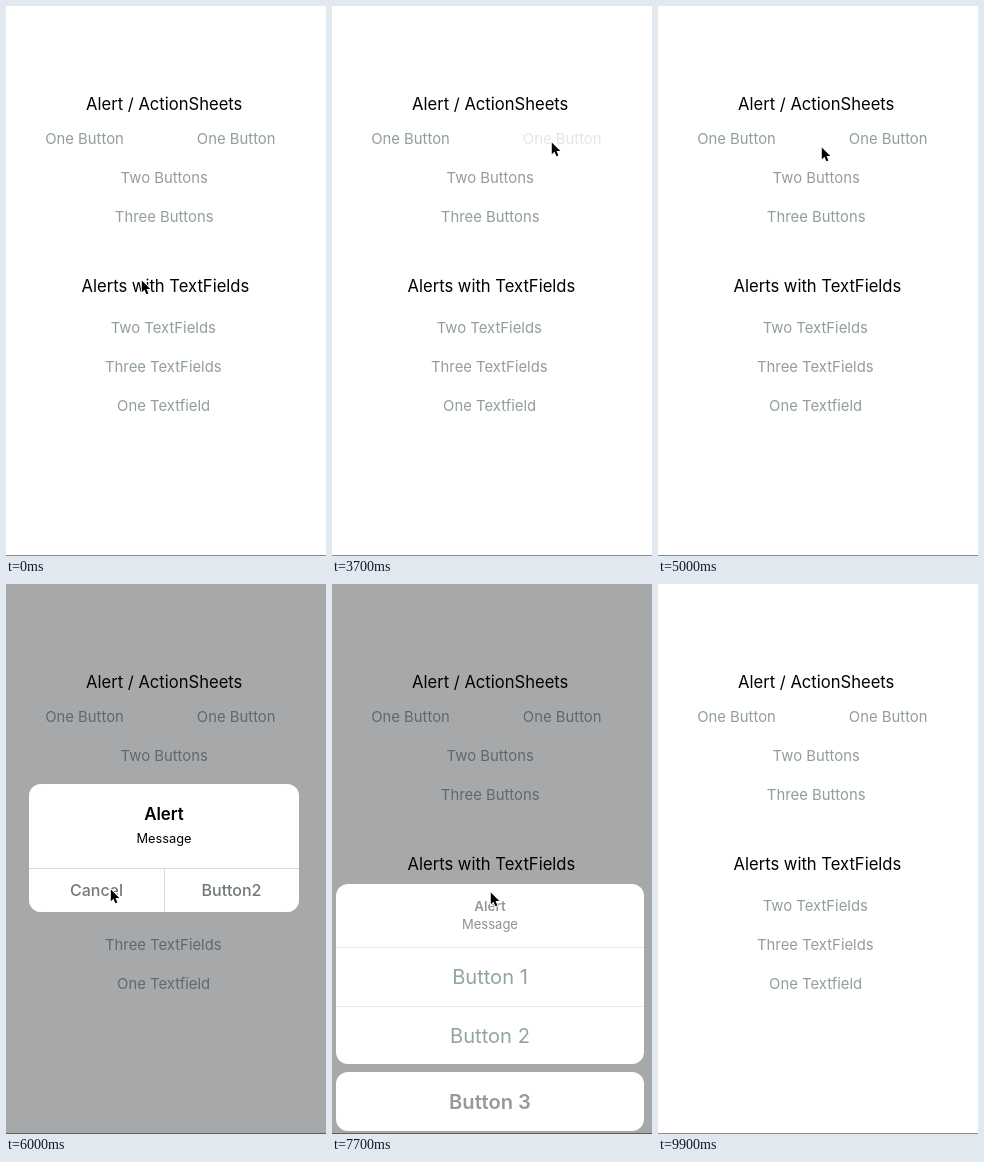
Animation, 320 px wide and 550 px high, one loop 10000 ms. Source, as an HTML page:

```html
<!DOCTYPE html>
<html lang="en">
<head>
<meta charset="utf-8">
<title>Alerts and action sheets</title>
<style>
  html, body { margin: 0; width: 100%; height: 100%; overflow: hidden; background: #fff; }
  #stage { position: relative; width: 320px; height: 550px; overflow: hidden; background: #fff; }
  #stage > * { position: absolute; left: 0; top: 0; }
  svg { display: block; overflow: visible; }
  text { font-family: Inter, "Open Sans", sans-serif; text-anchor: middle; }
  .head { font-size: 16.6px; fill: #000; }
  .link { font-size: 14.85px; fill: #919da0; }
  #dim { width: 320px; height: 550px; background: rgb(0, 3, 9); }
  #stage > .alert { left: 23px; top: 200px; width: 270px; height: 128px; border-radius: 12px; }
  .alert .title { font-size: 16.9px; font-weight: 600; }
  .alert .msg { font-size: 12.8px; }
  .alert .btn { font-size: 16px; font-weight: 500; fill: #70787c; }
  .alert path { stroke: #dbdbdf; }
  .sheet rect { fill: #fff; }
  .sheet path { stroke: #e6e8e9; }
  .sheet .title { font-size: 13.4px; font-weight: 600; fill: #979899; }
  .sheet .msg { font-size: 13px; fill: #8f9091; }
  .sheet .btn { font-size: 20.1px; fill: #93a3a5; }
  .sheet .bold { font-weight: 600; fill: #97999a; }
</style>
</head>
<body>
<div id="stage">
  <svg width="320" height="550">
    <text class="head" x="158.2" y="104">Alert / ActionSheets</text>
    <text class="link" id="oneAlert" x="78.5" y="138">One Button</text>
    <text class="link" id="oneSheet" x="230.2" y="138">One Button</text>
    <text class="link" id="two" x="158.2" y="177">Two Buttons</text>
    <text class="link" id="three" x="158.2" y="216">Three Buttons</text>
    <text class="head" x="159.4" y="286">Alerts with TextFields</text>
    <text class="link" x="157.3" y="327">Two TextFields</text>
    <text class="link" x="157.3" y="366">Three TextFields</text>
    <text class="link" x="157.6" y="405">One Textfield</text>
    <rect y="549" width="320" height="1" fill="#8c8c8c"/>
  </svg>
  <div id="dim"></div>

  <div class="alert" id="alert1">
    <svg width="270" height="128">
      <text class="title" x="135" y="35.7">Alert</text>
      <text class="msg" x="135" y="59.4">Message</text>
      <path d="M0 84.5H270"/>
      <text class="btn" x="135" y="112">Button1</text>
    </svg>
  </div>
  <div class="alert" id="alert2">
    <svg width="270" height="128">
      <text class="title" x="135" y="35.7">Alert</text>
      <text class="msg" x="135" y="59.4">Message</text>
      <path d="M0 84.5H270M135.5 84.5V128"/>
      <text class="btn" x="67.5" y="112">Cancel</text>
      <text class="btn" x="202.5" y="112">Button2</text>
    </svg>
  </div>

  <svg class="sheet" id="sheet1" width="320" height="550">
    <rect x="4" y="417" width="308" height="63" rx="12"/>
    <text class="title" x="158" y="444">Alert</text>
    <text class="msg" x="158" y="462">Message</text>
    <rect x="4" y="488" width="308" height="59" rx="12"/>
    <text class="btn bold" x="158" y="525">Button 1</text>
  </svg>
  <svg class="sheet" id="sheet3" width="320" height="550">
    <rect x="4" y="300" width="308" height="180" rx="12"/>
    <text class="title" x="158" y="327">Alert</text>
    <text class="msg" x="158" y="345">Message</text>
    <path d="M4 363.5H312M4 422.5H312"/>
    <text class="btn" x="158" y="400">Button 1</text>
    <text class="btn" x="158" y="459">Button 2</text>
    <rect x="4" y="488" width="308" height="59" rx="12"/>
    <text class="btn bold" x="158" y="525">Button 3</text>
  </svg>

  <svg id="cursor" width="12" height="18">
    <path d="M.8 1.4V13.2L3.5 10.7L5.4 15.3L7.4 14.4L5.5 10H9.3Z" fill="#000"
          stroke="#fff" stroke-width="1.8" paint-order="stroke" stroke-linejoin="round"/>
  </svg>
</div>
<script>
const LOOP = 10000, STEP = 100;
const get = id => document.getElementById(id);
const clamp = v => Math.max(0, Math.min(1, v));
const ramp = (t, start, length) => clamp((t - start) / length);
const easeOut = p => 1 - (1 - p) ** 3.3;

// Each popup: the link that opens it, its box, and when it opens and closes
const popups = [
  { link: 'oneAlert', box: 'alert1', open: 2000, close: 2850 },
  { link: 'oneSheet', box: 'sheet1', open: 3750, close: 4450, drop: 135 },
  { link: 'two', box: 'alert2', open: 5400, close: 6200 },
  { link: 'three', box: 'sheet3', open: 7200, close: 8650, drop: 252 }
];

// Pointer stops: time, x, y
const path = [
  [0, 135, 273], [400, 135, 273], [900, 116, 196], [1400, 97, 129], [2200, 97, 129],
  [2650, 155, 304], [2950, 155, 304], [3450, 219, 135], [3850, 219, 135],
  [4250, 160, 508], [4500, 160, 508], [5000, 163, 140], [5200, 157, 168], [5500, 157, 168],
  [5950, 104, 304], [6350, 104, 304], [6700, 139, 256], [7000, 153, 208], [7350, 155, 210],
  [7700, 158, 307], [8300, 158, 503], [9200, 158, 503]
];
const hideCursor = 9200;

function pointer(t) {
  const i = path.findIndex(k => k[0] > t);
  if (i < 1) return path[path.length - 1].slice(1);
  const [t0, x0, y0] = path[i - 1], [t1, x1, y1] = path[i];
  const p = (t - t0) / (t1 - t0);
  return [x0 + (x1 - x0) * p, y0 + (y1 - y0) * p];
}

function drawAlert(box, shown, left) {
  const a = shown * left;
  box.style.transform = `scale(${1 + 0.2 * (1 - shown)})`;
  box.style.background = `rgba(255, 255, 255, ${a})`;
  box.style.backdropFilter = `brightness(${1 + 0.33 * a})`;
  box.firstElementChild.style.opacity = a ** 0.65;
}

function draw(t) {
  let dim = 0;
  for (const { link, box, open, close, drop } of popups) {
    const shown = easeOut(ramp(t, open, 400));
    const gone = ramp(t, close, 350);
    const el = get(box);
    el.style.visibility = shown > 0 && gone < 1 ? 'visible' : 'hidden';
    if (drop) el.style.transform = `translateY(${drop * (1 - shown + gone * gone)}px)`;
    else drawAlert(el, shown, 1 - gone);
    dim = Math.max(dim, ramp(t, open, 100) * (1 - gone));
    const pressed = ramp(t, open - 150, 50) * (1 - ramp(t, open + 150, 300));
    get(link).style.opacity = 1 - 0.75 * pressed;
  }
  get('dim').style.opacity = 0.345 * dim;

  const [x, y] = pointer(t);
  const cursor = get('cursor');
  cursor.style.transform = `translate(${x}px, ${y}px)`;
  cursor.style.visibility = t < hideCursor ? 'visible' : 'hidden';
}

const start = performance.now();
function tick() {
  const t = (performance.now() - start) % LOOP;
  draw(Math.floor(t / STEP) * STEP);
  requestAnimationFrame(tick);
}
tick();
</script>
</body>
</html>
```
